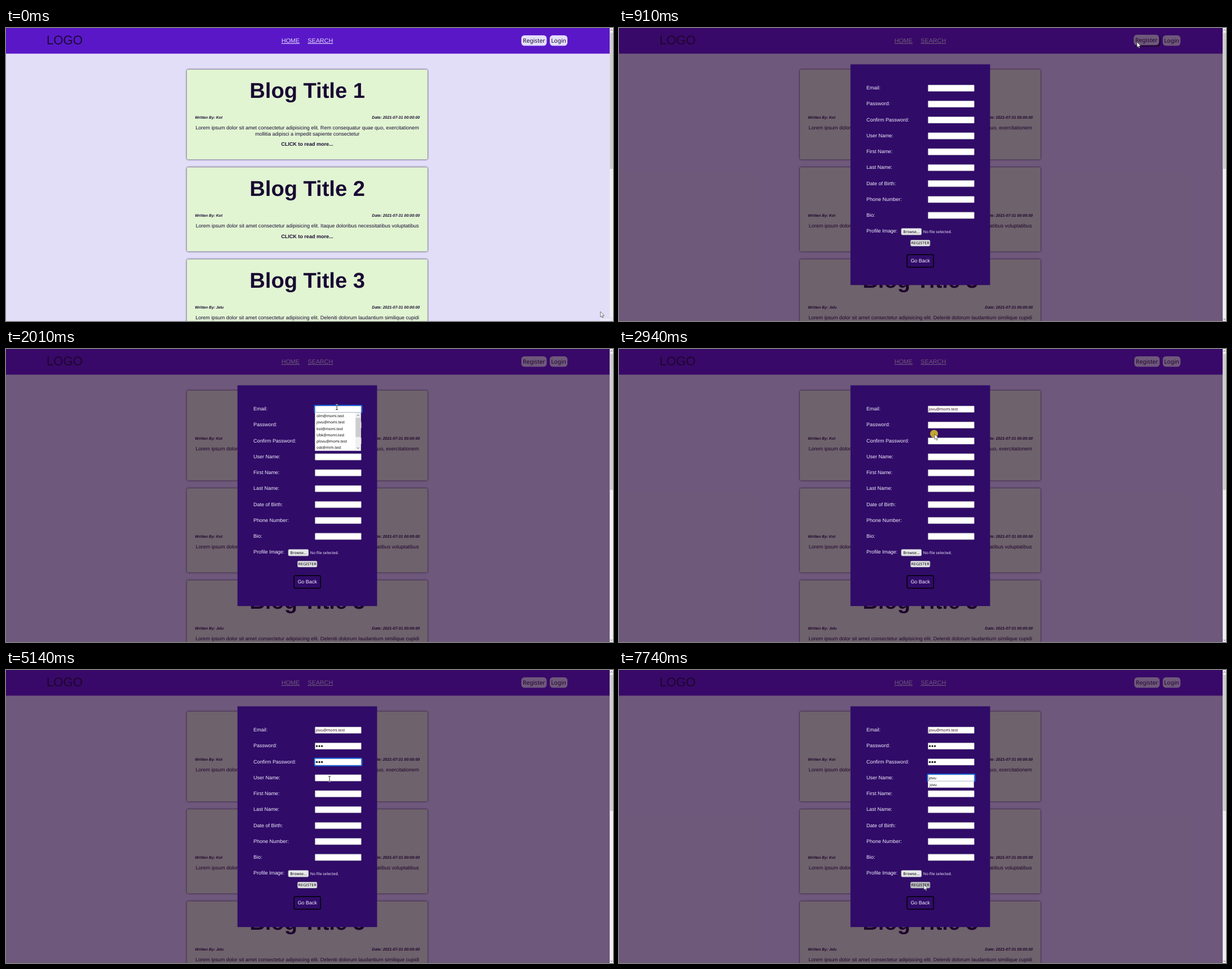
An HTML page that plays this animation: 1077 px wide and 520 px high, repeating every 8000 ms.

```html
<!DOCTYPE html>
<html lang="en">
<head>
<meta charset="utf-8">
<title>Blog registration</title>
<style>
  html, body { margin: 0; width: 100%; height: 100%; overflow: hidden; background: #e3def8; }
  svg { display: block; width: 100%; height: 100%; }
  text { font-family: "Liberation Sans", Arial, sans-serif; font-size: 9.03px; fill: #190933; text-rendering: geometricPrecision; white-space: pre; }
  .mid { text-anchor: middle; }
  .logo { font-size: 22.2px; }
  .nav { font-size: 10.77px; fill: #e3def8; text-decoration: underline; }
  .title { font-size: 38.1px; font-weight: bold; }
  .meta { font-size: 6.73px; font-weight: bold; font-style: italic; }
  .date { font-size: 6.98px; text-anchor: end; }
  .more { font-weight: bold; }
  .card { fill: #e1f5d2; filter: drop-shadow(0 0 1.4px #190933); }
  .label { fill: #f1edfc; font-size: 8.97px; }
  .ui { font-family: "Noto Sans", "Open Sans", sans-serif; font-size: 6.8px; fill: #000; }
  .pill { font-size: 10.2px; fill: #190933; }
  .small { font-size: 6.55px; }
  .light { fill: #f1edfc; }
  .field { fill: #fff; stroke: #8f8f9d; stroke-width: .6; }
  .button { fill: #e9e9ed; stroke: #8f8f9d; stroke-width: .7; }
  .popup { fill: #fff; stroke: #b9b9c4; stroke-width: .5; }
  .chevron { fill: none; stroke: #505050; stroke-width: .9; }
  .hover { transform: translate(-1px, -1px); filter: drop-shadow(2.2px 2.2px 1.3px rgba(0, 0, 0, .85)); }
  #ring { fill: none; stroke: #0b72f5; stroke-width: 1.5; }
  #ibeam { fill: none; stroke: #fff; stroke-width: .8; mix-blend-mode: difference; }
</style>
</head>
<body>
<svg id="stage" viewBox="0 0 1077 520">
  <rect width="1077" height="520" fill="#e3def8"/>
  <rect width="1071.5" height="45.5" fill="#5a17c8"/>
  <text class="logo" x="72" y="29.4">LOGO</text>
  <text class="nav" x="488.7" y="26">HOME</text>
  <text class="nav" x="535.3" y="26">SEARCH</text>
  <g id="register">
    <rect x="914.3" y="13" width="45" height="18.6" rx="5.5" fill="#e3def8"/>
    <text class="ui pill mid" x="936.8" y="26.3">Register</text>
  </g>
  <rect x="964.8" y="13" width="31.4" height="18.6" rx="5.5" fill="#e3def8"/>
  <text class="ui pill mid" x="980.5" y="26.3">Login</text>
  <g id="cards"></g>

  <g id="modal">
    <rect width="1071.5" height="520" fill="rgb(34,0,40)" fill-opacity=".6"/>
    <rect x="410.7" y="64.5" width="247.7" height="391.7" fill="#300b68"/>
    <g id="fields"></g>
    <rect class="button" x="500.8" y="355.6" width="36" height="11.6" rx="2"/>
    <text class="ui mid" x="518.8" y="364">Browse...</text>
    <text class="ui light" x="539.8" y="364">No file selected.</text>
    <rect class="button" id="submit" x="517.3" y="376.3" width="34.6" height="10.8" rx="2"/>
    <text class="ui mid" x="534.6" y="384.4" style="font-size:7.1px">REGISTER</text>
    <rect x="511.1" y="402.3" width="47" height="22.2" rx="2" fill="none" stroke="#000" stroke-width="1.5"/>
    <text class="label mid" x="534.6" y="416">Go Back</text>

    <rect id="ring" x="547.2" width="84.4" height="13.4" rx="1.6"/>
    <text class="ui" id="email" x="549.5" y="109.3" style="fill:#33081c"></text>
    <text class="ui" id="user" x="549.5" y="194"></text>
    <g id="dots"></g>
    <rect id="caret" width=".7" height="8.6"/>
    <g id="emailList"></g>
    <g id="userList">
      <rect class="popup" x="548.2" y="197.2" width="81.4" height="11.6"/>
      <text class="ui small" x="551" y="205.5">jovu</text>
    </g>
  </g>

  <g>
    <rect x="1071.3" width="6" height="520" fill="#f0f0f0"/>
    <rect x="1071.3" y="8.5" width="6" height="241.5" fill="#cdcdcd"/>
    <path class="chevron" d="M1072.4 4.6l1.8-1.8 1.8 1.8M1072.4 515.8l1.8 1.8 1.8-1.8"/>
  </g>
  <rect id="corner" x="1052.5" y="514.4" width="25" height="6" fill="#ebe8f7" stroke="#d3cee6" stroke-width=".5"/>

  <circle id="press" r="7" fill="#ffe81a" fill-opacity=".7"/>
  <path id="arrow" d="M0 0V9.4L2.2 7.4 3.7 10.8 5.2 10.2 3.7 6.9H6.7Z" fill="#fff" stroke="#222" stroke-width=".6"/>
  <path id="hand" d="M-1 1Q-1-.3 0-.3T1 1V4.6L4.8 5.6Q6 6 5.8 7.4L5 11.5H-.6L-3.6 7.6Q-3.8 6.4-2.6 6.6L-1 8Z" fill="#fff" stroke="#222" stroke-width=".6"/>
  <path id="ibeam" d="M-2-4.6H2M0-4.6V4.6M-2 4.6H2"/>
</svg>
<script>
const LOOP = 8000, ROW = 28.22;
const EMAIL = 'jovu@momi.test', USER = 'jovu';
const $ = id => document.getElementById(id);
const text = (s, x, y, cls) => `<text class="${cls}" x="${x}" y="${y}">${s}</text>`;

// Blog cards
const lead = 'Lorem ipsum dolor sit amet consectetur adipisicing elit. ';
const cards = [
  { top: 73.7, height: 159.6, by: 'Kot', lines: [lead + 'Rem consequatur quae quo, exercitationem', 'mollitia adipisci a impedit sapiente consectetur'] },
  { top: 247.2, height: 149.2, by: 'Kot', lines: [lead + 'Itaque doloribus necessitatibus voluptatibus'] },
  { top: 410.4, height: 149.2, by: 'Jelu', lines: [lead + 'Deleniti dolorum laudantium similique cupidi'] }
];
$('cards').innerHTML = cards.map(({ top, height, by, lines }, i) =>
  `<rect class="card" x="320.9" y="${top}" width="427" height="${height}" rx="2.5"/>` +
  text('Blog Title ' + (i + 1), 534.6, top + 50.4, 'title mid') +
  text('Written By: ' + by, 335.2, top + 87.7, 'meta') +
  text('Date: 2021-07-31 00:00:00', 734.2, top + 87.7, 'meta date') +
  lines.map((s, n) => text(s, 534.6, top + 106.6 + n * 10.3, 'mid')).join('') +
  text('CLICK to read more...', 534.4, top + 115 + lines.length * 10.3, 'more mid')
).join('');

// Form rows
const labels = ['Email', 'Password', 'Confirm Password', 'User Name', 'First Name', 'Last Name', 'Date of Birth', 'Phone Number', 'Bio', 'Profile Image'];
$('fields').innerHTML = labels.map((s, i) =>
  text(s + ':', 439, 109.2 + i * ROW, 'label') +
  (i < 9 ? `<rect class="field" x="548.3" y="${101.1 + i * ROW}" width="82" height="11.4" rx=".8"/>` : '')
).join('');

$('dots').innerHTML = [1, 2].map(row => [0, 1, 2].map(n =>
  `<circle cx="${551.5 + n * 4.5}" cy="${106.9 + row * ROW}" r="1.6"/>`).join('')).join('');
const dots = [...$('dots').children];

// Saved addresses
const saved = ['olm@momi.test', EMAIL, 'kot@momi.test', 'Ubk@momi.test', 'plovu@momi.test', 'osk@mim.test'];
$('emailList').innerHTML =
  '<rect class="popup" x="548.2" y="112.7" width="81.4" height="68"/>' +
  saved.map((s, i) => text(s, 551, 120.9 + i * 11.3, 'ui small')).join('') +
  '<rect x="620" y="113" width="9.4" height="67.4" fill="#f0f0f0"/>' +
  '<rect x="620.3" y="122.2" width="8.6" height="34" fill="#cdcdcd"/>' +
  '<path class="chevron" d="M622.7 118.7l2-2 2 2M622.7 174.8l2 2 2-2"/>';

// Pointer moves: first step, last step, number of steps, end point
const moves = [
  [100, 710, 7, 934.5, 21], [910, 910, 1, 919, 25], [1010, 1510, 6, 587, 103],
  [2230, 2430, 3, 566, 130], [2530, 2640, 2, 516, 141], [2740, 2740, 1, 560, 151],
  [3040, 3040, 1, 568, 138], [3750, 3850, 2, 575, 163], [4740, 4840, 2, 574, 189],
  [5030, 5240, 3, 574, 195], [5430, 5430, 1, 574, 192], [7150, 7740, 7, 541, 381]
];
const presses = [[810, 910], [1510, 1610], [2430, 2530], [2940, 3040], [3240, 3330], [4150, 4250], [5340, 5430]];
const caretGaps = [[2010, 2530], [5140, 5340], [5840, 6150], [6940, LOOP]];
const focus = [[1510, 2940, 0], [3240, 4150, 1], [4150, 5340, 2], [5340, LOOP, 3]];
const dotTimes = [3650, 3750, 3850, 4440, 4540, 4640];
const userTimes = [6150, 6250, 6450, 6750];

const within = (t, [a, b]) => t >= a && t < b;
const count = (times, t) => times.filter(at => t >= at).length;
const show = (el, on) => { el.style.display = on ? '' : 'none'; };

function pointerAt(t) {
  let x = 1054.7, y = 503.4;
  for (const [start, end, steps, toX, toY] of moves) {
    if (t < start) break;
    const gap = steps > 1 ? (end - start) / (steps - 1) : 1;
    const u = Math.min(1, (Math.floor((t - start) / gap + 1e-6) + 1) / steps);
    const eased = u * u * (3 - 2 * u);
    x += (toX - x) * eased;
    y += (toY - y) * eased;
  }
  return [x, y];
}

function drawPointer(t, listOpen) {
  const [x, y] = pointerAt(t);
  const row = (y - 101) / ROW;
  const inField = x > 548 && x < 630 && row >= 0 && row < 9 && (row % 1) * ROW < 12;
  const overList = listOpen && y > 112.7;
  const kind = within(t, [710, 910]) ? 'hand' : t >= 910 && inField && !overList ? 'ibeam' : 'arrow';
  for (const id of ['arrow', 'hand', 'ibeam']) show($(id), id === kind);
  $(kind).setAttribute('transform', `translate(${x} ${y})`);
  show($('press'), presses.some(p => within(t, p)));
  $('press').setAttribute('transform', `translate(${x - 1} ${y - .5})`);
}

function drawForm(t, listOpen) {
  const dotCount = count(dotTimes, t);
  dots.forEach((dot, i) => show(dot, i < dotCount));
  $('email').textContent = t >= 2530 ? EMAIL : '';
  $('user').textContent = USER.slice(0, count(userTimes, t));
  show($('emailList'), listOpen);
  show($('userList'), t >= userTimes[0]);
  $('submit').style.fill = t >= 7640 ? '#c3c3ca' : '';

  const active = focus.find(f => within(t, f));
  show($('ring'), active);
  show($('caret'), active && !caretGaps.some(g => within(t, g)));
  if (!active) return;
  const row = active[2];
  const typed = [
    () => $('email').getComputedTextLength(),
    () => Math.min(dotCount, 3) * 4.6,
    () => Math.max(dotCount - 3, 0) * 4.6,
    () => $('user').getComputedTextLength()
  ][row]();
  $('ring').setAttribute('y', 100.1 + row * ROW);
  $('caret').setAttribute('x', 549.4 + typed);
  $('caret').setAttribute('y', 102.5 + row * ROW);
}

function draw(now) {
  const t = now % LOOP;
  const listOpen = within(t, [1510, 2530]);
  show($('modal'), t >= 910);
  show($('corner'), t < 100);
  $('register').setAttribute('class', within(t, [710, 1010]) ? 'hover' : '');
  drawForm(t, listOpen);
  drawPointer(t, listOpen);
}

function frame(now) {
  draw(now);
  requestAnimationFrame(frame);
}
draw(0);
requestAnimationFrame(frame);
</script>
</body>
</html>
```
